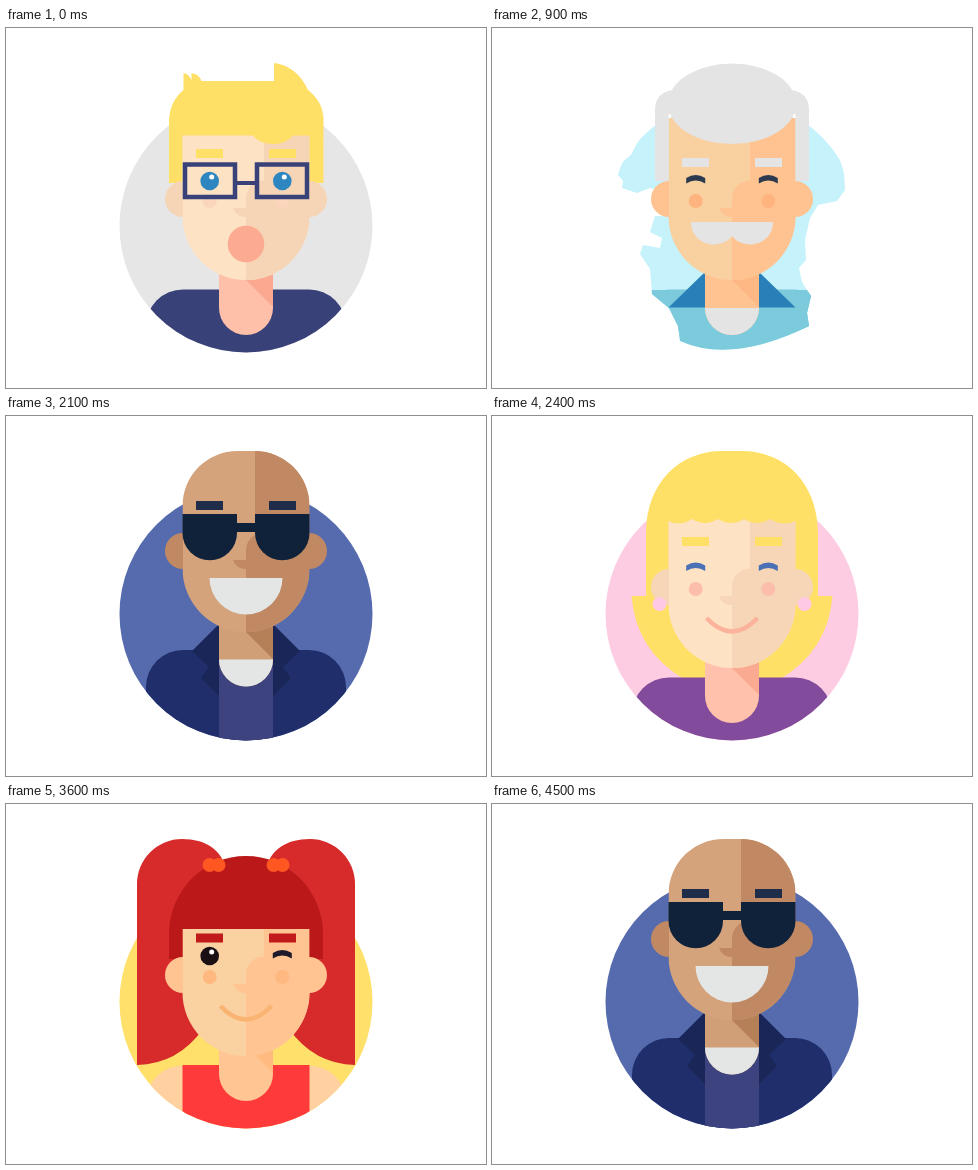
An HTML page that plays this animation: 480x360 px, repeating every 4800 ms.

```html
<!DOCTYPE html>
<html lang="en">
<head>
<meta charset="utf-8">
<title>Portraits</title>
<style>
html, body { margin: 0; width: 100%; height: 100%; overflow: hidden; background: #fff; }
svg { display: block; width: 100vw; height: 100vh; }
</style>
</head>
<body>
<svg id="stage" viewBox="0 0 480 360"></svg>
<script>
const STEP = 300;
const ORDER = 'ADCBFCAGDCEBFCDG';

const path = (d, fill) => `<path d="${d}" fill="${fill}"/>`;
const line = (d, stroke, w) => `<path d="${d}" fill="none" stroke="${stroke}" stroke-width="${w}"/>`;
const rect = (x, y, w, h, fill, rx = 0) => `<rect x="${x}" y="${y}" width="${w}" height="${h}" rx="${rx}" fill="${fill}"/>`;
const dot = (x, y, r, fill) => `<circle cx="${x}" cy="${y}" r="${r}" fill="${fill}"/>`;
const mirror = s => s + `<g transform="translate(480 0) scale(-1 1)">${s}</g>`;
const clip = (id, s) => `<g clip-path="url(#${id})">${s}</g>`;

const disc = fill => dot(240, 198, 126.5, fill);
const torso = (fill, y = 261.5) => rect(140, y, 200, 110, fill, 37);
const collar = (fill, y = 244) => mirror(path(`M213 ${y}V279.5H176.5Z`, fill));

// Neck with a slanted shadow; an undershirt replaces its round end.
function neck(fill, shade, { end = 280, chin = 252, under } = {}) {
  const cap = `M213 ${end}a27 27 0 0 0 54 0Z`;
  return path(`M213 ${end - 70}V${end}a27 27 0 0 0 54 0V${end - 70}Z`, fill) +
    path(`M240 ${chin}L267 ${chin + 27}V${chin - 20}H240Z`, shade) +
    (under ? path(cap, under) : '');
}

// Two-tone head: the shaded side includes brow edge, eye socket and nose.
function head(light, shade, dy = 0, top = 90) {
  const y = 188.5 + dy;
  return path(`M176.5 ${top}V${y}a63.5 63.5 0 0 0 127 0V${top}Z`, light) +
    path(`M258 ${top}V${152.5 + dy}a18 18 0 0 0 -18 18V${180 + dy}H227q3 9 13 9V${252 + dy}` +
      `A63.5 63.5 0 0 0 303.5 ${y}V${top}Z`, shade);
}

const ears = (fill, dy = 0) => mirror(path(`M177 ${153 + dy}a18 18 0 0 0 0 36Z`, fill));
const brows = (y, fill, x = 190) => mirror(rect(x, y, 27, 9, fill));
const cheeks = (fill, y = 173) => mirror(dot(203.7, y, 7, fill));
const eye = (x, y, fill) => dot(x, y, 9.3, fill) + dot(x + 2, y - 4, 2.5, '#fff');
const eyes = (y, fill) => eye(203.7, y, fill) + eye(276.3, y, fill);
const shut = (x, y, fill) => path(`M${x - 9.5} ${y}q9.5 -6 19 0v5.5q-9.5 -6 -19 0Z`, fill);
const shutEyes = (y, fill, x = 203.7) => mirror(shut(x, y, fill));
const grin = (y, fill) => path(`M203.5 ${y}h73a36.5 36.5 0 0 1 -73 0Z`, fill);
const smile = fill => line('M214.5 202Q240 229 265.5 202', fill, 4.5);
const crop = fill => `<ellipse cx="240" cy="75.8" rx="64" ry="40.2" fill="${fill}"/>` +
  mirror(path('M163 153V80Q164 65 180 62L184 86H176.5V153Z', fill));

function boyInGlasses() {
  const hair = '#FFE066', navy = '#394179';
  return disc('#E6E6E6') + clip('disc', torso(navy)) + neck('#FFC0AA', '#FCA890') +
    head('#FDE2C4', '#F6D5B6') +
    path('M163 155V92Q164 73 177.5 62V45Q183 46 185.5 52V45Q193 46 195.5 53H268V35Q291 38 302 62' +
      'Q317.5 74 317.5 92V155H303.5V107.5H287Q280 116 268 116Q253 116 247 107.5H176.5V155Z', hair) +
    ears('#F6D5B6') + cheeks('#FBD5BC') + brows(121, hair) + eyes(153, '#2E86C1') +
    mirror(`<rect x="179" y="136.5" width="50" height="32.5" fill="none" stroke="${navy}" stroke-width="4.5"/>`) +
    rect(231, 153, 18, 4, navy) + dot(240, 216, 18.3, '#FCAA91');
}

function grandfather() {
  const grey = '#E4E4E4';
  return clip('torn', disc('#C5F2FB') + torso('#7CCBDD') + rect(140, 262, 200, 40, '#7CCBDD', 8)) +
    collar('#2980B9') + neck('#FFC391', '#FDB884', { under: grey }) +
    head('#F9D0A0', '#FFC391') + crop(grey) + ears('#FFC391') +
    brows(130, grey) + shutEyes(150, '#2B3A4E') + cheeks('#FFB47F') +
    path('M199 194H281C281 208 270 216.5 258 216.5Q246 216 240 208Q234 216 222 216.5C210 216.5 199 208 199 194Z', grey);
}

function brunet() {
  const hair = '#7A3030';
  return disc('#7AD2A8') + clip('disc', torso('#FFD147')) +
    path('M346 228L358 232L370 226V290H336L340 264L349 254Z', '#fff') +
    collar('#FFE066', 235) +
    neck('#FFC391', '#E8BC7A', { chin: 243, under: '#E6E6E6' }) +
    head('#FFD3A1', '#FFC491', -9) +
    path('M163 148V82L160 80L162 74L159 64L167 62Q180 35 208 35Q224 35 234 42Q243 34 256 37Q264 35 272 35' +
      'A45 45 0 0 1 317 80V148H303.5V90Q300 107 285 107Q275 107 270 98H249Q240 116 212 116' +
      'Q186 116 176.5 98V148Z', hair) +
    ears('#FFC491', -9) + brows(121, hair) + eyes(143.5, '#22304D') +
    cheeks('#FFB880', 163.5) + grin(188.5, '#E6E6E6');
}

function blonde() {
  const hair = '#FFE066';
  let fringe = 'M303.5 105';
  for (const x of [278, 252, 226, 200]) fringe += `Q${x + 13} 111 ${x} 103`;
  fringe += 'Q187 111 176.5 105V180H154V118C154 66 188 35 230 35H250C292 35 326 66 326 118V180H303.5Z';
  return disc('#FDCCE3') +
    path('M139.5 180Q144 235 192 263H288Q336 235 340.5 180Z', hair) +
    clip('disc', torso('#834B9C')) + neck('#FFC1AB', '#FBAA92') +
    head('#FEE2C4', '#F7D6B7') + path(fringe, hair) + ears('#F7D6B7') +
    mirror(dot(167.5, 188, 7, '#FDC9E3')) + brows(121, hair) +
    shutEyes(149.5, '#4A70B5') + cheeks('#FCBDAA') + smile('#FBB39B');
}

function redBeard() {
  const hair = '#C41A1C', skin = '#FFC1AB';
  return path('M240 85L317 97A126.5 126.5 0 0 1 335 282H240L205 245L185 246L172 237L152 238L159 233L150 228' +
      'L172 225L164 214L169 202L163 190Z', '#E6E6E6') +
    clip('disc', torso('#12DF72')) + collar('#0CA75C') +
    neck(skin, '#FBAF97', { under: '#E6E6E6' }) +
    head(hair, hair) + rect(185, 90, 110, 99, '#FFCFBB') +
    path('M258 90V152.5a18 18 0 0 0 -18 18V171H229q3 9 11 9V189H295V90Z', skin) +
    crop(hair) + mirror(rect(170, 85, 15, 68, hair)) + ears(skin) +
    brows(120.5, hair, 194.5) + shutEyes(140.5, '#2A6650', 208) +
    cheeks('#FFB59B') + grin(197.5, '#E6E6E6');
}

function pigtails() {
  const hair = '#BA1819', skin = '#FFC491';
  return disc('#FFE06A') +
    mirror(path('M131 261V80A45 45 0 0 1 176 35C200 35 215 46 220 64V200L197 225Q172 260 131 261Z', '#D72A2A')) +
    clip('disc', torso('#FFD0A0') + rect(176.5, 261, 127, 70, '#FF3A3A')) +
    neck('#FFC693', '#FFBA80', { end: 270, chin: 242 }) +
    head('#FAD1A0', skin) +
    path('M163 155V130A77 78 0 0 1 317 130V155H303.5V125H176.5V155Z', hair) +
    mirror(dot(203.5, 61, 7, '#FF5722') + dot(212.5, 61, 7, '#FF5722')) +
    ears(skin) + brows(129.5, '#C01A1A') + eye(203.7, 152, '#1A1014') +
    shut(276.3, 149, '#1E1A2A') + cheeks('#FFB87F') + smile('#F9B473');
}

function sunglasses() {
  const dark = '#10213A', shade = '#C08963';
  return disc('#566BAE') +
    clip('disc', torso('#202F6B', 234) + rect(213, 230, 54, 100, '#3D437F')) +
    mirror(path('M213 208L186 235L203 251L195 262L213 280Z', '#1A2657')) +
    neck('#D09F78', '#B57F58', { end: 243.5, chin: 216, under: '#E4E6E6' }) +
    clip('bald', head('#D4A37C', shade, -36, 30) + rect(249, 30, 12, 88, shade)) +
    ears(shade, -36) + brows(85, '#1F2C4A') +
    mirror(path('M176.5 98H231V117a27.2 27.2 0 0 1 -54.5 0Z', dark)) +
    rect(230, 107, 20, 9, dark) + grin(162, '#E4E6E6');
}

const people = {
  A: boyInGlasses, B: grandfather, C: brunet, D: blonde,
  E: redBeard, F: pigtails, G: sunglasses
};

const stage = document.getElementById('stage');
stage.innerHTML = `<defs>
  <clipPath id="disc">${disc('#000')}</clipPath>
  <clipPath id="bald"><path d="M176.5 220V90A55 55 0 0 1 231.5 35H248.5A55 55 0 0 1 303.5 90V220Z"/></clipPath>
  <clipPath id="torn"><path d="M163 97Q150 103 139 127L130 134L126 147L131 153L130 160L145 165L158 160L176 165V188L163 188
    L158 204L170 210L168 220L151 217L148 226L158 241L160 266L177 280L186 298L188 313Q240 336 317 298L315 285L319 268
    L315 262L310 254L307 240L314 232L313 212L318 190L326 177L345 173L353 162L352 145L347 128L336 113L317 97L240 60Z"/></clipPath>
</defs>` + Object.entries(people).map(([key, draw]) => `<g id="${key}">${draw()}</g>`).join('');

const groups = Object.keys(people).map(key => document.getElementById(key));
const start = performance.now();

function show(ms) {
  const key = ORDER[Math.floor(ms / STEP) % ORDER.length];
  for (const g of groups) g.style.display = g.id === key ? '' : 'none';
}

function tick() {
  show(performance.now() - start);
  requestAnimationFrame(tick);
}
show(0);
requestAnimationFrame(tick);
</script>
</body>
</html>
```
